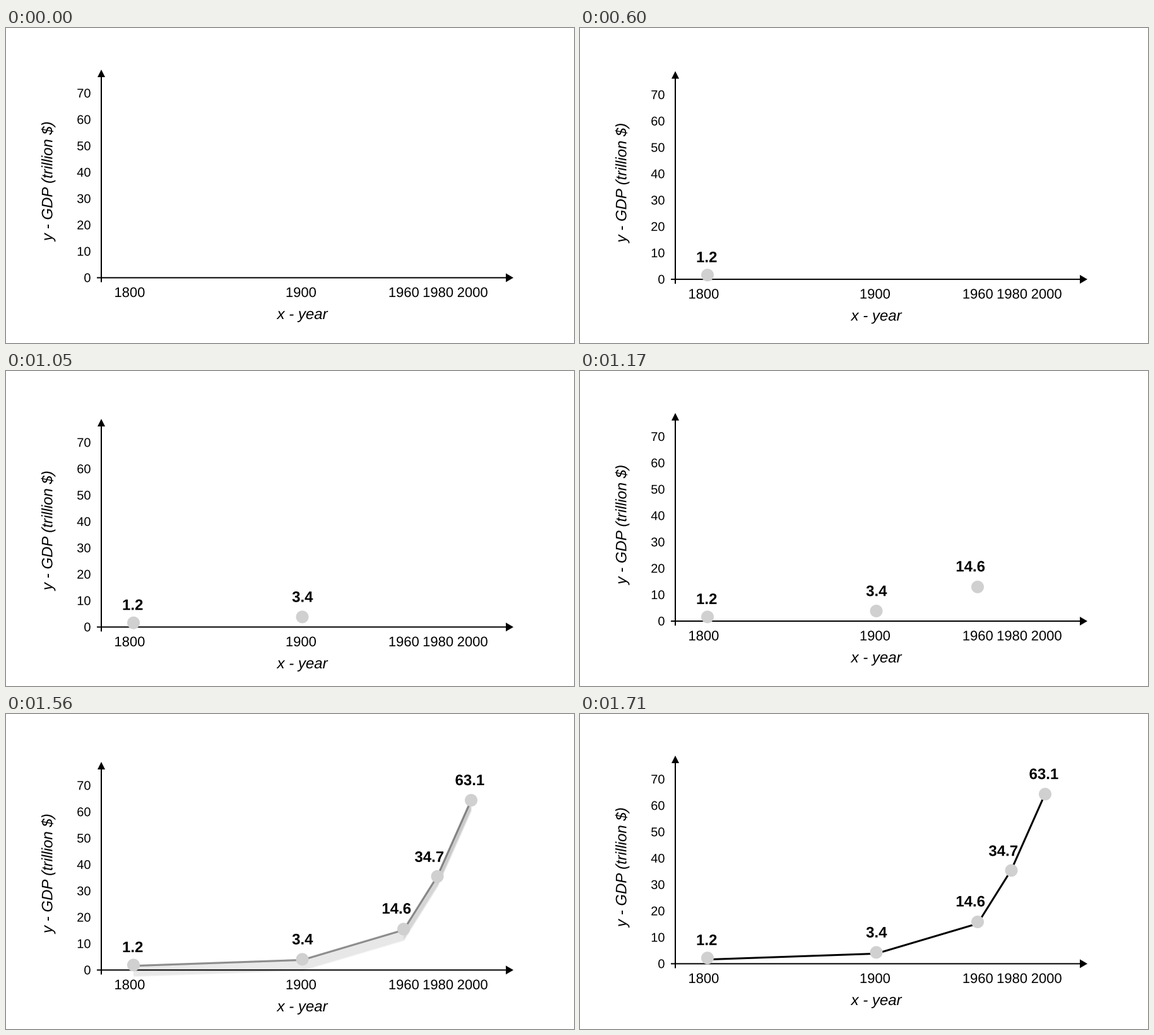
Write a matplotlib script that moves like this. It is 900x500 px and loops after 6150 ms.

```python
import numpy as np
import matplotlib.pyplot as plt
from matplotlib.animation import FuncAnimation
from matplotlib.patches import Circle, PathPatch, Polygon
from matplotlib.textpath import TextPath
from matplotlib.transforms import Affine2D

STEP, LOOP = 30, 6150
PX = 0.72  # points per pixel at 100 dpi
SAMPLES, SHUTTER = 16, 0.5
AXIS_X, AXIS_Y = 151, 396.4
LANDING, SETTLE = 4, 5  # steps from appearing to landing, then to rest
DROP, SPEED, JOLT = 334, 108, 10

# Year, GDP, settled height of the dot, label offset from the dot
POINTS = [(1800, 1.2, 387.2, (-1, -28.8)),
          (1900, 3.4, 378.4, (0.5, -32)),
          (1960, 14.6, 330, (-11, -32.8)),
          (1980, 34.7, 248.3, (-13, -31.3)),
          (2000, 63.1, 127.2, (-2, -32.2))]
CURVE_START = 1440
DOT_STARTS = [450] + [930 + 135 * i for i in range(4)]

fig = plt.figure(figsize=(9, 5), dpi=100, facecolor="white")
ax = fig.add_axes([0, 0, 1, 1])
ax.set_xlim(0, 900)
ax.set_ylim(500, 0)
ax.axis("off")

chart_shift = Affine2D()
chart_space = chart_shift + ax.transData


def year_x(year):
    return 202 + 2.675 * (year - 1800)


def gdp_y(gdp):
    return AXIS_Y - 1.6 - 4.25 * gdp


def write(x, y, text, size, space, align="center", angle=0, **font):
    """Draw text centred on (x, y), or ending at x when aligned right."""
    path = TextPath((0, 0), text, size=size,
                    prop={"family": "Liberation Sans", **font})
    box = path.get_extents()
    if align == "right":
        x -= box.width / 2
    place = (Affine2D().translate(-(box.x0 + box.x1) / 2,
                                  -(box.y0 + box.y1) / 2)
             .scale(1, -1).rotate_deg(-angle).translate(x, y))
    return ax.add_patch(PathPatch(path, fc="black", lw=0, zorder=6,
                                  transform=place + space))


def draw_arrow(start, end, half_width):
    """Axis line from start to end with a solid head at the end."""
    start, end = np.array(start), np.array(end)
    along = (end - start) / np.linalg.norm(end - start)
    across = half_width * along[::-1]
    neck = end - 12 * along
    ax.plot(*zip(start, neck + along), color="black", lw=2 * PX, snap=False,
            solid_capstyle="butt", transform=chart_space, zorder=1)
    ax.add_patch(Polygon([end, neck - across, neck + across], fc="black",
                         lw=0, transform=chart_space, zorder=1))


def draw_chart():
    draw_arrow((AXIS_X, 403.5), (AXIS_X, 66), 6)
    draw_arrow((144, AXIS_Y), (804, AXIS_Y), 7)
    for i in range(8):
        write(133.7, AXIS_Y - 41.85 * i, str(10 * i), 20, chart_space,
              align="right")
    for year, *_ in POINTS:
        write(196.3 + 2.715 * (year - 1800), 419.4, str(year), 22, chart_space)
    write(469.5, 458, "x - year", 24, chart_space, style="italic")
    write(67, 244.5, "y - GDP (trillion $)", 24, chart_space, angle=90,
          style="italic")


class Blurred:
    """A shape drawn once when still, or as faint copies when it moves."""

    def __init__(self, make):
        self.moves = [Affine2D() for _ in range(SAMPLES)]
        self.copies = [make(move + ax.transData) for move in self.moves]

    def place(self, ys):
        moving = np.ptp(ys) > 3
        if not moving:
            ys = np.full(SAMPLES, np.mean(ys))
        for i, (move, copy, y) in enumerate(zip(self.moves, self.copies, ys)):
            move.clear().translate(0, y)
            copy.set_visible(moving or i == 0)
            copy.set_alpha(1 / SAMPLES if moving else 1)


def make_dot(year):
    return Blurred(lambda space: ax.add_patch(
        Circle((year_x(year), 0), 10, fc="#d0d0d0", lw=0,
               transform=space, zorder=4)))


def make_curve():
    xs = [year_x(year) for year, *_ in POINTS]
    ys = [gdp_y(gdp) for _, gdp, *_ in POINTS]
    return Blurred(lambda space: ax.plot(
        xs, ys, color="black", lw=3 * PX, transform=space, zorder=3,
        solid_capstyle="butt", solid_joinstyle="miter")[0])


def make_label(year, gdp, offset):
    move = Affine2D()
    write(year_x(year) + offset[0], offset[1], str(gdp), 24,
          move + ax.transData, weight="bold")
    return move


draw_chart()
dots = [make_dot(year) for year, *_ in POINTS]
curve = make_curve()
labels = [make_label(year, gdp, offset) for year, gdp, _, offset in POINTS]


def steps_since(start, t):
    return (t - start) / STEP


def jolt_at(t):
    """Damped shake of the chart after the latest landing."""
    since = [steps_since(s, t) - LANDING for s in DOT_STARTS + [CURVE_START]]
    u = min((u for u in since if u >= 0), default=SETTLE)
    return JOLT * max(0, 1 - u / SETTLE) * np.cos(0.4 * np.pi * u)


def fall(k, jolt, rebound=0):
    """Offset from rest: a steady drop, a rebound, then the chart's shake."""
    drop = np.minimum(SPEED * k - DROP, JOLT + rebound * (LANDING - k))
    return np.where(k < LANDING, drop, jolt)


def update(frame):
    t = frame * STEP
    jolt = jolt_at(t)
    chart_shift.clear().translate(0, jolt)
    exposure = np.linspace(-SHUTTER / 2, SHUTTER / 2, SAMPLES)
    curve_k = steps_since(CURVE_START, t)
    settled = np.clip((curve_k - LANDING + 1) / 2, 0, 1)

    for dot, label, start, (_, gdp, final_y, _) in zip(
            dots, labels, DOT_STARTS, POINTS):
        k = steps_since(start, t)
        rest = gdp_y(gdp) + settled * (final_y - gdp_y(gdp))
        dot.place(rest + fall(k + exposure, jolt))
        label.clear().translate(0, rest + float(fall(k, jolt)))

    curve.place(fall(curve_k + exposure, jolt, rebound=64))
    return []


anim = FuncAnimation(fig, update, frames=LOOP // STEP, interval=STEP,
                     init_func=lambda: update(0), repeat=True,
                     repeat_delay=0, cache_frame_data=False)
plt.show()
```
